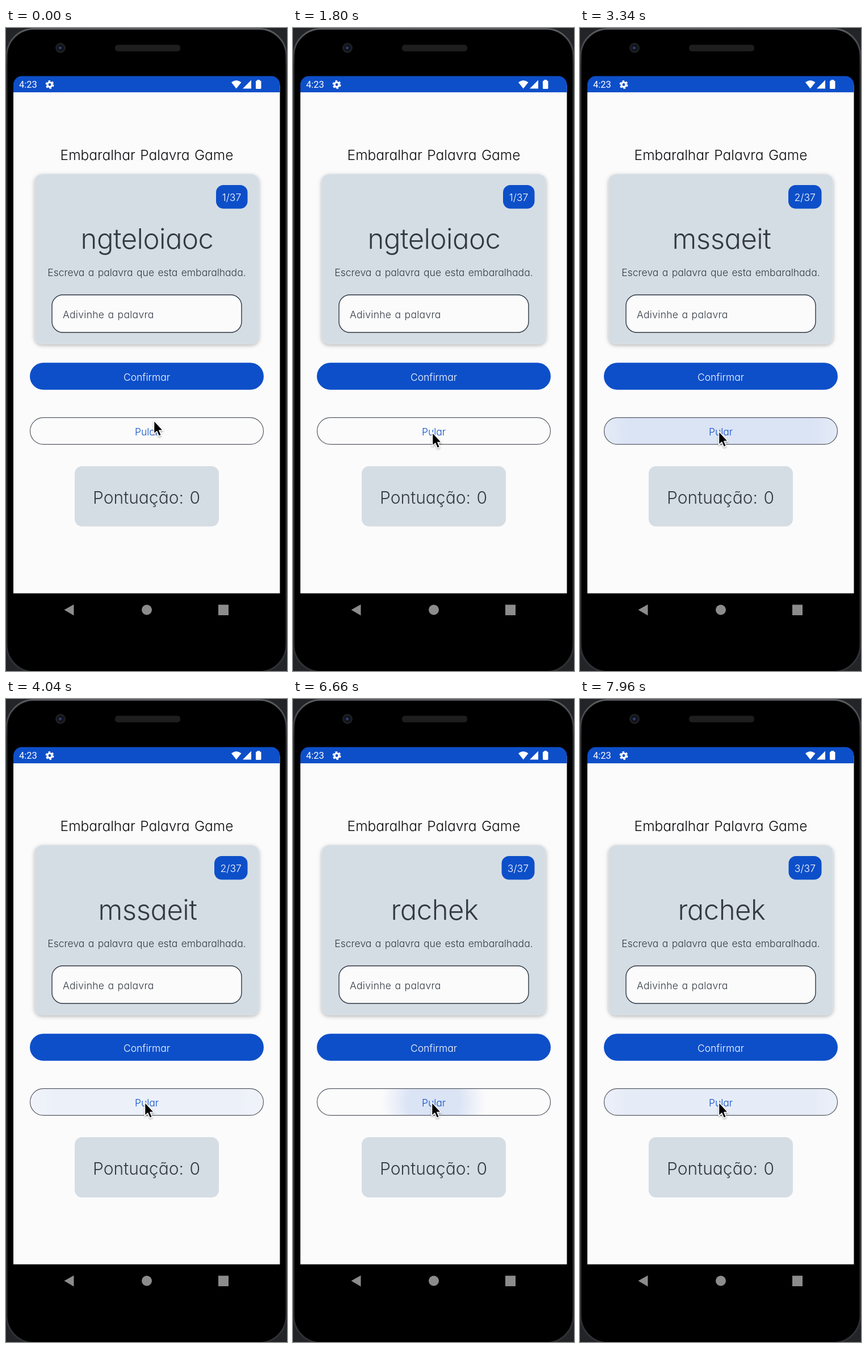
Recreate the animation shown at these times as an HTML page. Size 495 by 1130 pixels, loop 8 s.

```html
<!DOCTYPE html>
<html lang="pt">
<head>
<meta charset="utf-8">
<title>Palavra embaralhada</title>
<style>
  html, body { margin: 0; width: 100%; height: 100%; overflow: hidden; background: #232427; }
  svg { display: block; width: 100%; height: 100%; }

  text {
    font: 350 17.5px Inter, Lato, sans-serif;
    font-feature-settings: "cv11" 1;
    font-optical-sizing: none;
    fill: #333a43;
    text-anchor: middle;
  }
  .title { font-size: 24.5px; font-weight: 300; word-spacing: 1.5px; fill: #0c0c0e; }
  .word { font-size: 49px; font-weight: 300; letter-spacing: -.5px; }
  .hint { word-spacing: 1.5px; }
  .label { letter-spacing: .3px; word-spacing: 1px; text-anchor: start; }
  .score { font-size: 30px; font-weight: 300; word-spacing: 2px; }
  .light { fill: #fff; }
  .link { fill: #0d4fc9; }
  .clock { font: 400 16.5px Roboto, sans-serif; fill: #fff; text-anchor: start; }

  .blue { fill: #0d4fc9; }
  .panel { fill: #d5dde4; }
  .paper { fill: #fbfbfc; }

  .round { visibility: hidden; animation: 8s step-end infinite; }
  .first { animation-name: first; }
  .second { animation-name: second; }
  .third { animation-name: third; }
  @keyframes first { 0% { visibility: visible } 31%, 100% { visibility: hidden } }
  @keyframes second { 0% { visibility: hidden } 31% { visibility: visible } 82.4%, 100% { visibility: hidden } }
  @keyframes third { 0% { visibility: hidden } 82.4%, 100% { visibility: visible } }

  .ripple { animation: spread 8s ease-out infinite, glow 8s linear infinite; }
  @keyframes spread {
    0%, 31.25% { transform: scale(.2) }
    43.75%, 82.4% { transform: scale(1) }
    82.5% { transform: scale(.2) }
    95%, 100% { transform: scale(1) }
  }
  @keyframes glow {
    0%, 31.3% { opacity: 0 }
    32%, 43.75% { opacity: 1 }
    56.25%, 82.5% { opacity: 0 }
    83.2%, 95% { opacity: 1 }
    100% { opacity: .6 }
  }

  .cursor { animation: point 8s ease-in-out infinite; }
  @keyframes point {
    0%, 2% { transform: translate(260px, 689px) }
    12%, 25% { transform: translate(245px, 710px) }
    27%, 100% { transform: translate(244px, 708px) }
  }
</style>
</head>
<body>
<svg viewBox="0 0 495 1130" preserveAspectRatio="none">
  <defs>
    <radialGradient id="wave">
      <stop offset=".5" stop-color="#0d4fc9" stop-opacity=".13"/>
      <stop offset="1" stop-color="#0d4fc9" stop-opacity="0"/>
    </radialGradient>
    <linearGradient id="rim" x2="0" y2="1">
      <stop stop-color="#5a5c60"/>
      <stop offset=".06" stop-color="#2f3135"/>
      <stop offset="1" stop-color="#2f3135"/>
    </linearGradient>
    <filter id="lift" x="-10%" y="-10%" width="120%" height="120%">
      <feDropShadow dx="0" dy="2" stdDeviation="3.5" flood-color="#000" flood-opacity=".3"/>
    </filter>
    <filter id="drop" x="-40%" y="-40%" width="200%" height="200%">
      <feDropShadow dx="0" dy="1.5" stdDeviation="1.5" flood-color="#000" flood-opacity=".35"/>
    </filter>
    <clipPath id="pill"><rect x="42" y="684.5" width="412" height="47.5" rx="23.7"/></clipPath>
  </defs>

  <!-- Phone body -->
  <rect width="495" height="1130" fill="#232427"/>
  <rect x="1" y="1.5" width="493" height="1130" rx="48" fill="#000" stroke="url(#rim)" stroke-width="3"/>
  <circle cx="96" cy="35" r="9" fill="#1d1e22"/>
  <circle cx="96" cy="35" r="5.5" fill="#0d0f18"/>
  <circle cx="95.5" cy="35" r="2.8" fill="#2c3a62"/>
  <rect x="192" y="29.5" width="115" height="11.5" rx="5" fill="#1e1e1f"/>

  <!-- Screen and status bar -->
  <path class="paper" d="M13 100H482.5V993.5H13Z"/>
  <path class="blue" d="M13 113V99.500a15 15 0 0 1 15-15H467.500a15 15 0 0 1 15 15V113Z"/>
  <text class="clock" x="23" y="105">4:23</text>
  <g fill="none" stroke="#fff">
    <circle cx="77" cy="99.5" r="4" stroke-width="3.2"/>
    <circle cx="77" cy="99.5" r="6" stroke-width="3" stroke-dasharray="3.4 2.883"/>
  </g>
  <g fill="#fff">
    <path d="M397 95.500Q405.500 88.500 414.500 95.500L405.700 106.500Z"/>
    <path d="M417 106.500L432 91.500V106.500Z"/>
    <path d="M442.500 92.500V91H447V92.500H448Q449.500 92.500 449.500 94V105.500Q449.500 107 448 107H441.500Q440 107 440 105.500V94Q440 92.500 441.500 92.500Z"/>
  </g>

  <!-- Game card -->
  <text class="title" x="248" y="232">Embaralhar Palavra Game</text>
  <rect class="panel" x="50.5" y="257" width="395" height="298.5" rx="13" filter="url(#lift)"/>
  <g class="round first">
    <rect class="blue" x="370" y="276" width="55.5" height="41.5" rx="13"/>
    <text class="light" x="397.5" y="304">1/37</text>
    <text class="word" x="248.5" y="388">ngteloiaoc</text>
  </g>
  <g class="round second">
    <rect class="blue" x="367" y="276" width="58.5" height="41.5" rx="13"/>
    <text class="light" x="396.2" y="304">2/37</text>
    <text class="word" x="249.5" y="388">mssaeit</text>
  </g>
  <g class="round third">
    <rect class="blue" x="367.5" y="276" width="58" height="41.5" rx="13"/>
    <text class="light" x="396.4" y="304">3/37</text>
    <text class="word" x="249.5" y="388">rachek</text>
  </g>
  <text class="hint" x="248" y="436">Escreva a palavra que esta embaralhada.</text>
  <rect class="paper" x="81" y="469" width="334" height="66" rx="19" stroke="#2f3742" stroke-width="1.4"/>
  <text class="label" x="100" y="509.5">Adivinhe a palavra</text>

  <!-- Buttons and score -->
  <rect class="blue" x="42" y="588.3" width="412" height="47.5" rx="23.7"/>
  <text class="light" x="248" y="619.5">Confirmar</text>
  <g clip-path="url(#pill)">
    <g transform="translate(247.5 708.5)"><circle class="ripple" r="330" fill="url(#wave)"/></g>
  </g>
  <rect x="42.5" y="684.7" width="411" height="47" rx="23.5" fill="none" stroke="#565a62" stroke-width="1.2"/>
  <text class="link" x="248" y="715.5">Pular</text>
  <rect class="panel" x="121" y="770" width="254" height="106" rx="13"/>
  <text class="score" x="247.5" y="835.5">Pontuação: 0</text>

  <!-- Navigation bar -->
  <g fill="#8c8c8c">
    <path d="M102.500 1022.500L119.500 1013V1032.500Z"/>
    <circle cx="248" cy="1022.5" r="9"/>
    <rect x="374" y="1013.5" width="18" height="18.5"/>
  </g>

  <g class="cursor">
    <path d="M.5 .8V24.500L5.700 19.700L9.300 28.300L13.500 26.500L9.900 18.200H16.800Z"
      stroke="#fff" stroke-width="1.5" stroke-linejoin="round" filter="url(#drop)"/>
  </g>
</svg>
</body>
</html>
```
